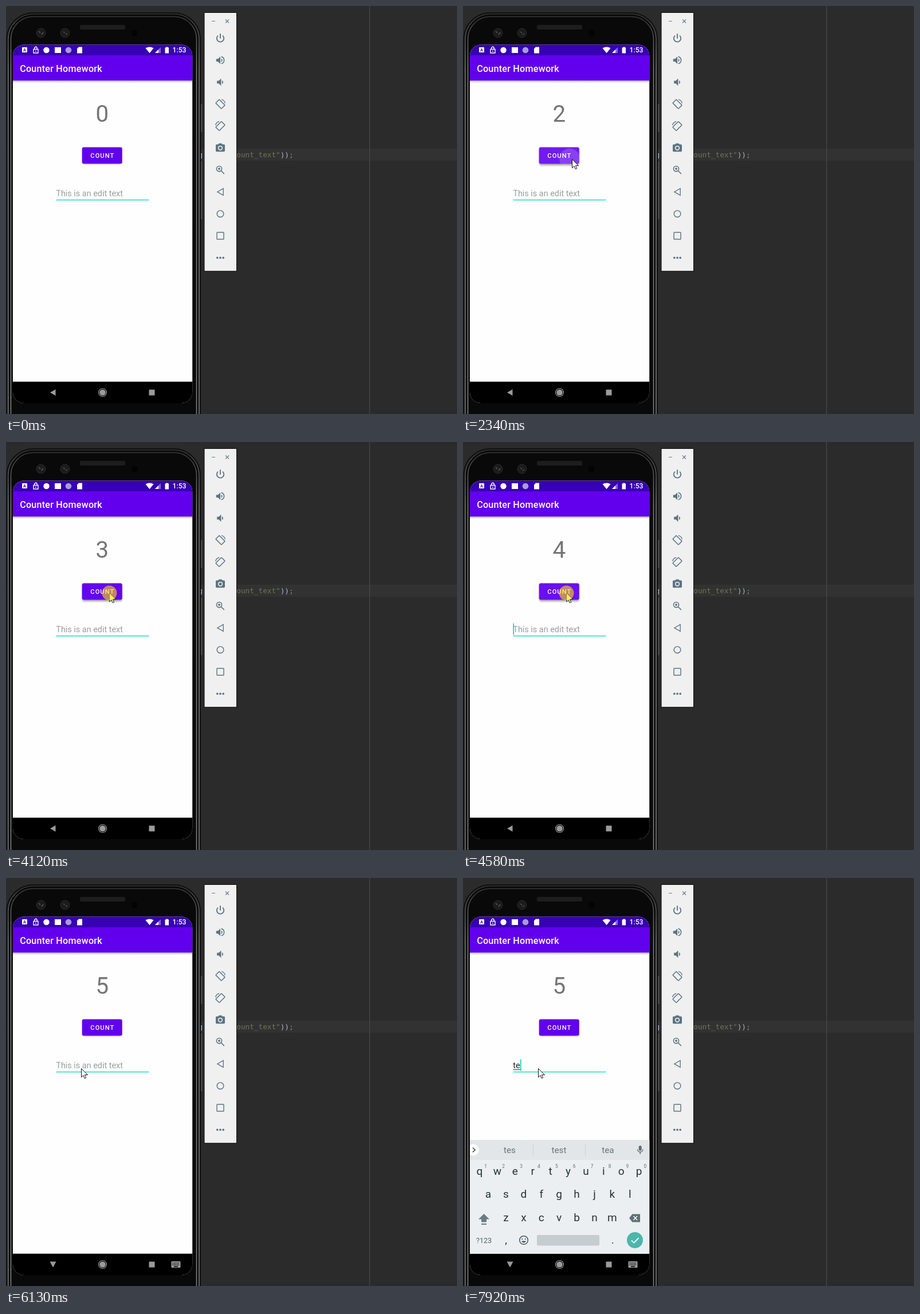
Recreate the animation shown at these times as an HTML page. Size 787 by 712 pixels, loop 7990 ms.

```html
<!DOCTYPE html>
<html lang="en">
<head>
<meta charset="utf-8">
<title>Counter Homework</title>
<style>
html, body { margin: 0; width: 100%; height: 100%; overflow: hidden; background: #2b2b2b; }
svg { display: block; width: 787px; height: 712px; font-family: Roboto, sans-serif; }
.mid { text-anchor: middle; }
.medium { font-weight: 500; }
.code { font: 12.7px "DejaVu Sans Mono", monospace; white-space: pre; }
.tool { fill: none; stroke: #5b7482; stroke-width: 2; }
.solid { fill: #5b7482; stroke: none; }
</style>
</head>
<body>
<svg viewBox="0 0 787 712">
  <defs>
    <linearGradient id="edge" gradientUnits="userSpaceOnUse" x1="0" y1="12" x2="0" y2="110">
      <stop offset="0" stop-color="#333"/><stop offset="1" stop-color="#858585"/>
    </linearGradient>
    <linearGradient id="barShadow" x1="0" y1="0" x2="0" y2="1">
      <stop offset="0" stop-color="#000" stop-opacity=".3"/><stop offset="1" stop-color="#000" stop-opacity="0"/>
    </linearGradient>
    <filter id="blur" x="-20%" y="-40%" width="140%" height="190%"><feGaussianBlur stdDeviation="1.8"/></filter>
    <clipPath id="screenClip"><rect x="12" y="67.5" width="313.2" height="625.5" rx="19"/></clipPath>
    <clipPath id="buttonClip"><rect x="132.7" y="246.5" width="70" height="28.7" rx="3"/></clipPath>
  </defs>

  <!-- editor -->
  <rect width="787" height="712" fill="#2b2b2b"/>
  <rect y="249" width="787" height="21" fill="#323232"/>
  <path d="M634 0V712" stroke="#4c4c4c" transform="translate(.5)"/>
  <text class="code" y="264" fill="#a9b7c6"><tspan x="335.5">g(</tspan><tspan x="402.3" fill="#6f7358">ount_text"</tspan>))<tspan fill="#8a8574">;</tspan></text>

  <!-- phone body -->
  <path d="M341 171V220M341 271V372" stroke="#4a4a4a" stroke-width="3"/>
  <rect x="1.5" y="12" width="337.5" height="800" rx="46" fill="#090909" stroke="#111" stroke-width="2"/>
  <g fill="none" stroke="url(#edge)">
    <rect x="3.7" y="14" width="333.3" height="800" rx="44" stroke-width="1.5"/>
    <rect x="8.5" y="18.5" width="324" height="800" rx="39" stroke-width="1.5"/>
  </g>
  <rect x="129" y="33" width="79" height="8" rx="2" fill="#1d1d1d"/>
  <g fill="#1b1b1b" stroke="#2a2a2a">
    <circle cx="61" cy="47" r="8"/><circle cx="103" cy="47" r="8"/>
    <circle cx="224" cy="47" r="5.5" fill="#030303" stroke="none"/>
    <path d="M57 44l3 3m2 3l3-4M100 45l3 2m1 3l3-2" stroke="#555" stroke-width="1.5"/>
  </g>

  <g clip-path="url(#screenClip)">
    <rect x="12" y="67" width="314" height="626" fill="#fefefe"/>
    <rect x="12" y="130" width="314" height="4" fill="url(#barShadow)"/>
    <rect x="12" y="67" width="314" height="20" fill="#3700b3"/>
    <rect x="12" y="86" width="314" height="44" fill="#6200ee"/>

    <!-- status bar -->
    <g fill="#fff">
      <rect x="28" y="72" width="9" height="9" rx="1"/>
      <path d="M30.5 79.5l2-5.5 2 5.5M31.3 77.8h2.4" fill="none" stroke="#3700b3"/>
      <path d="M48 75.5h8v6.5h-8zM49.7 75.5v-2a2.2 2.2 0 0 1 4.4 0v2" fill="none" stroke="#fff" stroke-width="1.4"/>
      <circle cx="52" cy="78.8" r="1"/>
      <circle cx="70.5" cy="77" r="5.2"/>
      <rect x="85" y="72" width="11" height="10"/>
      <circle cx="109" cy="77" r="5.3" fill="#a99bdb"/>
      <path d="M127 71.5h6v11h-9v-8zM243.5 73.5q7-4 14 0l-7 8.8z"/>
      <path d="M270 72v10h-10z" fill="#8a6ad0"/><path d="M266 76v6h-6z"/>
      <path d="M279.5 71.5h3v1h1.5v10h-6.5v-10h2z"/>
      <text class="medium" x="290.5" y="81.3" font-size="12.2">1:53</text>
    </g>
    <text class="medium" x="24.2" y="115" font-size="16.2" letter-spacing=".2" fill="#fff">Counter Homework</text>

    <!-- page -->
    <text id="count" class="mid" x="167.8" y="202" font-size="40.3" fill="#757575">0</text>
    <rect x="133.5" y="247.5" width="68.5" height="29" rx="3" filter="url(#blur)" opacity=".2"/>
    <rect id="lift" x="133" y="249" width="69.5" height="29.5" rx="3" filter="url(#blur)" opacity=".25"/>
    <g clip-path="url(#buttonClip)">
      <rect x="132" y="246" width="72" height="30" fill="#6200ee"/>
      <rect id="glow" x="132" y="246" width="72" height="30" fill="#fff"/>
      <circle id="ripple" fill="#fff"/>
    </g>
    <text class="mid medium" x="168.3" y="265.2" font-size="11.2" letter-spacing="1" fill="#fff">COUNT</text>
    <text id="entry" x="87.3" y="332" font-size="14.4"></text>
    <path id="composing" d="M87.5 334.5h0" stroke="#333"/>
    <path d="M87.5 338.5h162" stroke="#1edac9" stroke-width="1.6"/>
    <path id="caret" d="M0 316.5v20" stroke="#03cdbb" stroke-width="1.6"/>

    <!-- navigation -->
    <rect x="12" y="655.6" width="314" height="38"/>
    <g fill="#9b9b9b">
      <path id="back"/>
      <circle cx="168.5" cy="674.5" r="5.3"/>
      <circle cx="168.5" cy="674.5" r="7" fill="none" stroke="#9b9b9b" stroke-width="1.2"/>
      <rect x="249.5" y="669.5" width="10" height="10"/>
      <g id="imeIcon">
        <rect x="288.5" y="669" width="16" height="11" rx="1"/>
        <path d="M290.5 672h12m-12 3h12" stroke="#000" stroke-width="1.5" stroke-dasharray="1.5 1"/>
        <path d="M293 678h7" stroke="#000" stroke-width="1.3"/>
      </g>
    </g>
    <g id="keyboard"></g>
  </g>

  <!-- emulator toolbar -->
  <rect x="346" y="11.5" width="56.5" height="451.3" fill="#f0f0f0" stroke="#0c0c0c"/>
  <path d="M359 26.5h6M383 23.5l6 6m0-6l-6 6" stroke="#6b7f89" stroke-width="1.2"/>
  <g id="tools"></g>

  <g id="pointer">
    <path d="M0 0V15.2L3.5 12 5.8 17.2 8.2 16.1 5.9 11.1H10.9Z" fill="#fff" stroke="#111"/>
    <circle id="press" r="13" fill="#ffdc10" opacity=".6"/>
  </g>
</svg>
<script>
const LOOP = 7990;
const $ = id => document.getElementById(id);
const set = (node, attrs) => { for (const k in attrs) node.setAttribute(k, attrs[k]); };
const show = (node, on) => { node.style.display = on ? '' : 'none'; };
const clamp = v => Math.min(1, Math.max(0, v));

const SPEAKER = '<path class="solid" d="M3 9v6h4l5 5V4L7 9z"/><path class="solid" d="M14 8a4.5 4.5 0 0 1 0 8z"/>';
const ROTATE = '<rect x="6.5" y="3.2" width="11" height="17.6" rx="1" transform="rotate(-45 12 12)" stroke-width="1.9"/><path d="M14.5 2a11 11 0 0 1 8 8" stroke-width="1.7"/>';
const tools = [
  '<path d="M7 6.2A7.8 7.8 0 1 0 17 6.2M12 2v10.5" stroke-width="2.3"/>',
  SPEAKER + '<path d="M14 4.2a8 8 0 0 1 0 15.6"/>',
  `<g transform="translate(1.7)">${SPEAKER}</g>`,
  ROTATE,
  `<g transform="matrix(-1 0 0 1 24 0)">${ROTATE}</g>`,
  '<path class="solid" d="M9 2L7.2 4H4a2 2 0 0 0-2 2v12a2 2 0 0 0 2 2h16a2 2 0 0 0 2-2V6a2 2 0 0 0-2-2h-3.2L15 2z"/><circle cx="12" cy="12" r="4.2" stroke="#f0f0f0"/>',
  '<circle cx="9.5" cy="9.5" r="5.7"/><path d="M14 14l6.5 6.5M7 9.5h5M9.5 7v5"/>',
  '<path d="M18.5 4.5v15L5.5 12z" stroke-width="1.7"/>',
  '<circle cx="12" cy="12" r="7.3" stroke-width="1.8"/>',
  '<rect x="4.5" y="4.5" width="15" height="15" rx="1" stroke-width="1.8"/>',
  '<path d="M5.5 12h0M12 12h0M18.5 12h0" stroke-width="4.6" stroke-linecap="round"/>'
];
$('tools').innerHTML = tools.map((icon, i) =>
  `<g class="tool" transform="translate(374 ${56.3 + 38.3 * i}) scale(.8) translate(-12 -12)">${icon}</g>`).join('');

const label = (x, y, size, text, fill = '#263238') =>
  `<text class="mid" x="${x}" y="${y}" font-size="${size}" fill="${fill}">${text}</text>`;
const keyRow = (keys, x, y) => [...keys].map((k, i) => label(x + 30.9 * i, y, 19, k)).join('');

function buildKeyboard() {
  const hints = [...'1234567890'].map((n, i) => label(39.7 + 30.9 * i, 505.5, 8.3, n, '#607078')).join('');
  $('keyboard').innerHTML = `
    <rect x="12" y="457" width="314" height="237" fill="#ebeff1"/>
    <rect x="12" y="457" width="314" height="35" fill="#e2e6e9"/>
    <path d="M122.5 464v21M213.5 464v21" stroke="#cbd1d4"/>
    <circle cx="18" cy="474.5" r="10" fill="#fff"/>
    <path d="M17 470.5l4 4-4 4" fill="none" stroke="#37474f" stroke-width="1.6"/>
    ${[81.5, 167.5, 253].map(x => label(x, 480, 15.2, '', '#66757d')).join('')}
    <rect x="306.7" y="467" width="5" height="9" rx="2.5" fill="#5f6f77"/>
    <path d="M304.5 473.5a4.7 4.7 0 0 0 9.4 0M309.2 478.5v3.5" fill="none" stroke="#5f6f77" stroke-width="1.4"/>
    ${hints}
    ${keyRow('qwertyuiop', 29, 518)}${keyRow('asdfghjkl', 44, 558)}${keyRow('zxcvbnm', 75, 599)}
    <path d="M36.5 586l9.5 9.5h-5v5h-9v-5h-5zM32 603h9v2h-9z" fill="#6c7a82"/>
    <path d="M290 593.5l5.5-7H309v14h-13.5z" fill="#5f6f77"/>
    <path d="M297.5 590l6.5 7m0-7l-6.5 7" stroke="#fff" stroke-width="1.5"/>
    ${label(36.5, 637, 12.5, '?123', '#546069')}${label(75, 638, 18, ',')}${label(261, 638, 18, '.')}
    <circle cx="106" cy="632" r="7.3" fill="none" stroke="#46555d" stroke-width="1.5"/>
    <path d="M103.3 630h0M108.7 630h0" stroke="#46555d" stroke-width="2.2" stroke-linecap="round"/>
    <path d="M102 633.5a4.3 4.3 0 0 0 8 0z" fill="#46555d"/>
    <rect x="129" y="623" width="109" height="18.5" rx="2" fill="#c7ccd0"/>
    <circle cx="300" cy="632" r="14" fill="#4db6ac"/>
    <path d="M294 632.5l4.2 4.2 8.3-8.5" fill="none" stroke="#fff" stroke-width="1.8"/>`;
  return [...$('keyboard').querySelectorAll('text')].slice(0, 3);
}
const suggestions = buildKeyboard();

// time, x, y
const path = [
  [170, 494, 643], [330, 400, 440], [500, 290, 270], [650, 222, 220], [930, 190, 266], [1010, 190, 267],
  [2800, 190, 267], [3260, 180, 263], [4700, 180, 263], [5040, 134, 324], [5190, 131, 332], [LOOP, 131, 332]
];
const presses = [[1400, 1680], [2070, 2230], [3410, 3640], [4080, 4250], [4500, 4640], [5420, 5650]];
const counts = [1850, 2260, 3700, 4250, 4700];

function pointerAt(t) {
  const i = Math.max(1, path.findIndex(p => p[0] > t));
  const [a, b] = [path[i - 1], path[i]];
  const u = clamp((t - a[0]) / (b[0] - a[0]));
  return [1, 2].map(k => a[k] + (b[k] - a[k]) * u);
}

function drawButton(t) {
  const n = counts.filter(c => t >= c).length;
  $('count').textContent = n;
  const age = n ? t - counts[n - 1] : Infinity;
  const fade = age < 250 ? 1 : clamp(1 - (age - 250) / 200);
  const grow = clamp(age / 225);
  const [x, y] = n > 2 ? [180, 263] : [190, 267];
  set($('glow'), { opacity: .1 * fade });
  set($('ripple'), {
    cx: x + (168 - x) * grow * .5, cy: y + (261 - y) * grow * .2,
    r: 5 + 36 * grow, opacity: .16 * clamp(1 - (age - 80) / 220)
  });
  show($('lift'), counts.some(c => t >= c - 150 && t < c + 280));
}

function drawEntry(t) {
  const typed = t >= 7750 ? 'te' : t >= 7690 ? 't' : '';
  const width = [0, 4.7, 12.5][typed.length];
  $('entry').textContent = typed || 'This is an edit text';
  set($('entry'), { fill: typed ? '#242424' : '#9c9c9c' });
  set($('composing'), { d: `M87.5 334.5h${width}` });
  set($('caret'), { transform: `translate(${88.2 + width})` });
  const blink = t >= 460 && (t - 460) % 1000 < 500;
  show($('caret'), t < 6430 ? blink : t < 7190 || t >= 7430);
}

function drawKeyboard(t) {
  const words = t < 7690 ? ['thanks', 'I', 'we'] : t < 7920 ? ['to', 'the', 'that'] : ['tes', 'test', 'tea'];
  suggestions.forEach((node, i) => { node.textContent = words[i]; });
  const [dy, opacity] = t < 7210 ? [37, .6] : t < 7280 ? [14, .85] : [0, 1];
  const keyboard = $('keyboard');
  show(keyboard, t >= 7190);
  set(keyboard, { transform: `translate(0 ${dy})`, opacity });
  // once settled, the keyboard ends above the navigation bar
  set(keyboard.children[0], { height: dy ? 237 : 198.6 });
  show($('imeIcon'), t >= 6130);
  set($('back'), { d: t >= 6130 ? 'M76.5 669.5h11l-5.5 10z' : 'M77 674.5l9.5-5.5v11z' });
}

function draw(t) {
  drawButton(t);
  drawEntry(t);
  drawKeyboard(t);
  const [x, y] = pointerAt(t);
  set($('pointer'), { transform: `translate(${Math.round(x) + .5} ${Math.round(y) + .5})` });
  show($('pointer'), t >= 170);
  show($('press'), presses.some(([from, to]) => t >= from && t < to));
}

const start = performance.now();
function tick() {
  draw((performance.now() - start) % LOOP);
  requestAnimationFrame(tick);
}
tick();
</script>
</body>
</html>
```
